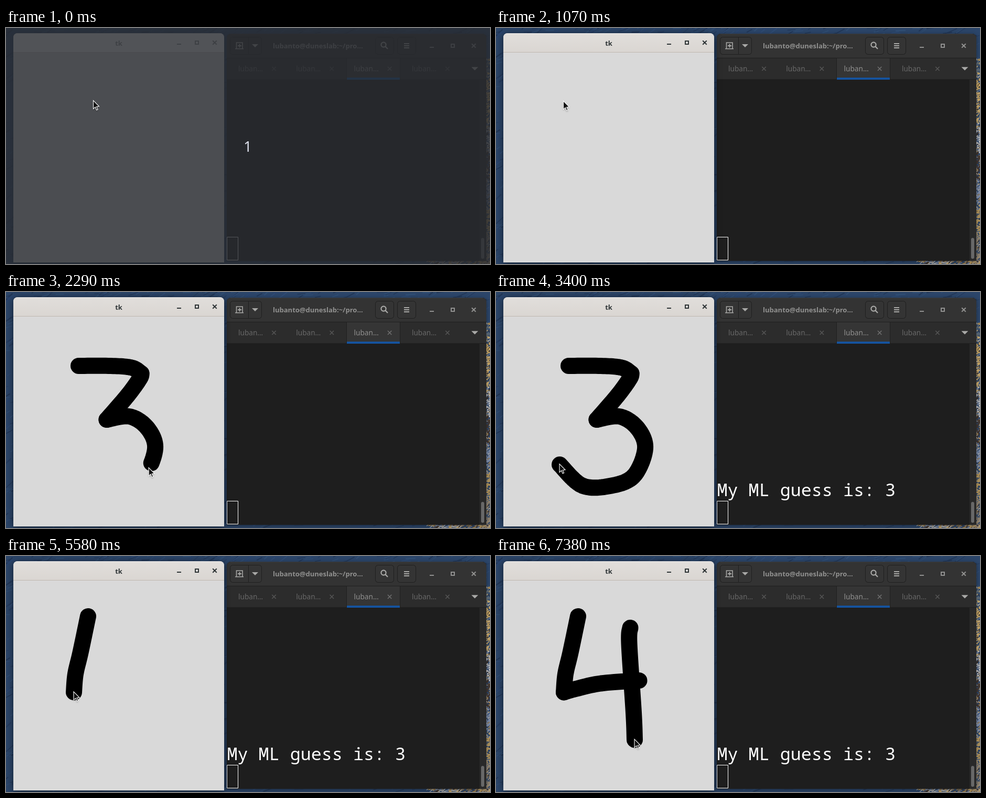
An HTML page with a canvas for the animation above (8000 ms loop, 923 by 452 pixels).

```html
<!DOCTYPE html>
<html lang="en">
<head>
<meta charset="utf-8">
<title>Digit guess</title>
<style>
html, body { margin: 0; width: 100%; height: 100%; overflow: hidden; background: #24344f; }
canvas { display: block; }
</style>
</head>
<body>
<canvas id="stage" width="923" height="452"></canvas>
<script>
const stage = document.getElementById('stage');
let ctx = stage.getContext('2d');
const W = 923, H = 452, LOOP = 8000;
const SANS = '"Noto Sans", sans-serif', MONO = '"Noto Sans Mono", monospace';
const FOCUS_AT = 1070, GUESS_AT = 3400, CLEAR_AT = 4420;
const BRUSH = 31, LEAD = 11;

const speedUp = p => p ** 1.15;
const slowDown = p => 1 - (1 - p) ** 2.2;

// Samples a Catmull-Rom curve through a few key points.
function smooth(keys, detail = 12) {
  const key = i => keys[Math.max(0, Math.min(keys.length - 1, i))];
  const points = [keys[0]];
  for (let i = 0; i < keys.length - 1; i++) {
    for (let j = 1; j <= detail; j++) {
      const u = j / detail;
      points.push([0, 1].map(axis => {
        const [a, b, c, d] = [-1, 0, 1, 2].map(k => key(i + k)[axis]);
        return b + u / 2 * (c - a + u * (2 * a - 5 * b + 4 * c - d + u * (3 * (b - c) + d - a)));
      }));
    }
  }
  return points;
}

// One pointer gesture, shown in evenly timed steps.
function gesture(ink, start, end, steps, keys, clear = LOOP) {
  const points = smooth(keys);
  const lengths = points.slice(1).map(([x, y], i) => Math.hypot(x - points[i][0], y - points[i][1]));
  return { ink, start, end, steps, clear, points, lengths, total: lengths.reduce((a, b) => a + b, 0) };
}

const rest = (at, x, y) => gesture(false, at, at, 1, [[x, y]]);

const gestures = [
  rest(0, 166, 138),
  rest(580, 161, 138),
  rest(1070, 128, 139),
  gesture(true, 1330, 1400, 2, [[138.5, 141.5], [200, 141.5], [240, 145], [258, 156]], CLEAR_AT),
  gesture(true, 1560, 1870, 5, [[258, 156], [255, 166], [232, 198], [192, 244.5]], CLEAR_AT),
  gesture(true, 2020, 2670, 8, [[192, 244.5], [236, 238.5], [270, 261], [284.5, 300], [263, 352],
    [220, 371], [165, 371], [121.5, 330.5]], CLEAR_AT),
  gesture(false, 4690, 5040, 5, [[120.5, 328], [126, 225], [148, 128], [156, 113]]),
  gesture(true, 5200, 5580, 5, [[156.5, 115.5], [142, 185], [132.5, 226], [129.5, 261]]),
  gesture(true, 5760, 6000, 4, [[129.5, 261], [150, 255], [200, 244], [273, 238.5]]),
  gesture(false, 6270, 6600, 5, [[272, 236.5], [261, 164], [255, 137]]),
  gesture(true, 6780, 7380, 7, [[256, 137.5], [254, 168], [262.5, 300], [264.5, 352]])
];

// Length of the gesture covered at time t, held between steps.
function covered(g, t) {
  const gap = (g.end - g.start) / Math.max(1, g.steps - 1) || 1;
  const step = Math.min(g.steps, Math.floor((t - g.start) / gap + 1.15));
  return (g.ink ? speedUp : slowDown)(step / g.steps) * g.total;
}

function pointAt({ points, lengths }, length) {
  for (let i = 0; i < lengths.length; i++) {
    if (length <= lengths[i]) {
      const k = length / lengths[i], [a, b] = [points[i], points[i + 1]];
      return [a[0] + (b[0] - a[0]) * k, a[1] + (b[1] - a[1]) * k];
    }
    length -= lengths[i];
  }
  return points[points.length - 1];
}

function pointerAt(t) {
  const g = gestures.filter(g => g.start <= t).pop();
  if (!g.ink) return pointAt(g, covered(g, t));
  const [x, y] = pointAt(g, covered(g, t) + LEAD);
  return [x - 1, y - 2];
}

function fillRect(x, y, w, h, color) {
  ctx.fillStyle = color;
  ctx.fillRect(x, y, w, h);
}

function box(x, y, w, h, radius, fill, line) {
  ctx.beginPath();
  ctx.roundRect(x, y, w, h, radius);
  if (fill) { ctx.fillStyle = fill; ctx.fill(); }
  if (line) { ctx.strokeStyle = line; ctx.lineWidth = 1; ctx.stroke(); }
}

function lines(color, width, ...paths) {
  ctx.strokeStyle = color;
  ctx.lineWidth = width;
  ctx.beginPath();
  for (const p of paths) p.forEach(([x, y], i) => i ? ctx.lineTo(x, y) : ctx.moveTo(x, y));
  ctx.stroke();
}

function text(str, x, y, font, color, align = 'left') {
  ctx.font = font;
  ctx.fillStyle = color;
  ctx.textAlign = align;
  ctx.fillText(str, x, y);
}

function cross(x, y, r, color, width = 2) {
  lines(color, width, [[x - r, y - r], [x + r, y + r]], [[x + r, y - r], [x - r, y + r]]);
}

function triangle(x, y, r, color) {
  ctx.fillStyle = color;
  ctx.beginPath();
  ctx.moveTo(x - r, y - r / 2);
  ctx.lineTo(x + r, y - r / 2);
  ctx.lineTo(x, y + r / 2);
  ctx.fill();
}

function windowControls(x, y, step, color) {
  fillRect(x - 4, y + 2, 8, 2, color);
  ctx.strokeStyle = color;
  ctx.lineWidth = 2;
  ctx.strokeRect(x + step - 3, y - 3, 6, 6);
  cross(x + step * 2, y, 3.8, color);
}

function shadowed(alpha, blur, draw) {
  ctx.save();
  ctx.shadowColor = `rgba(0,0,0,${alpha})`;
  ctx.shadowBlur = blur;
  ctx.shadowOffsetY = 2;
  draw();
  ctx.restore();
}

let seed = 7;
const random = () => (seed = seed * 16807 % 2147483647) / 2147483647;
const pick = list => list[Math.floor(random() * list.length)];

function streaks(count, x, y, w, h, size, colorAt) {
  for (let i = 0; i < count; i++) {
    const px = x + random() * w, py = y + random() * h;
    const dx = size * (.5 + random()), dy = -dx * random();
    lines(colorAt(py), 1 + random() * 1.5, [[px, py], [px + dx, py + dy]]);
  }
}

function paintWallpaper() {
  const blues = ['#263d60', '#2f4b74', '#2a4570', '#304e74', '#223757'];
  const earth = ['#c9a765', '#8f754c', '#3c3029', '#6d7f9e', '#b0aeaa'];
  const bands = ['#2f4c70', '#5f6d79', '#d0ad68', '#d3b170', '#c4c4c4', '#45362c', '#8190ad', '#bd9c5d', '#9a8a72'];
  fillRect(0, 0, W, H, '#2b4569');
  streaks(2500, -10, 0, W, H, 14, () => pick(blues));
  streaks(160, 800, 444, 120, 10, 6, () => pick(earth));
  streaks(1200, 908, 60, 15, 392, 3, y => random() < .3 ? pick(earth)
    : bands[Math.min(bands.length - 1, Math.floor((y + random() * 20) / H * bands.length))]);
}

const wallpaper = document.createElement('canvas');
wallpaper.width = W;
wallpaper.height = H;
const screen = ctx;
ctx = wallpaper.getContext('2d');
paintWallpaper();
ctx = screen;

function terminal(t) {
  const dim = '#919190', icon = '#a9a9a7', edge = '#1f1f1f';
  shadowed(.4, 8, () => box(421, 11, 495, 435, [8, 8, 0, 0], '#1e1e1e'));
  box(421, 11, 495, 47, [8, 8, 0, 0], '#333333');
  fillRect(428, 11, 481, 1, '#3b3b3b');
  fillRect(421, 57, 495, 1, edge);

  for (const [x, w] of [[427.5, 60], [704.5, 35], [746.5, 35]]) box(x, 17.5, w, 33, 5, '#343434', edge);
  fillRect(462, 18, 1, 33, edge);
  lines(icon, 1.6, [[437, 39.8], [453, 39.8]], [[439.5, 39.5], [439.5, 28], [451, 28], [451, 39.5]]);
  fillRect(442, 33, 7, 2, icon);
  fillRect(444.5, 30.5, 2, 7, icon);
  triangle(475, 34, 6, icon);
  lines(icon, 2.2, [[723.4, 35.4], [728, 40]]);
  ctx.beginPath();
  ctx.arc(720, 32, 4.6, 0, Math.PI * 2);
  ctx.stroke();
  for (let y = 29; y <= 37; y += 4) fillRect(759, y, 10, 2, icon);
  text('lubanto@duneslab:~/pro…', 509, 39, `bold 13px ${SANS}`, dim);
  windowControls(812, 34, 40, dim);

  fillRect(421, 58, 495, 40, '#2c2c2c');
  fillRect(649, 58, 103, 40, edge);
  fillRect(650, 58, 101, 40, '#353535');
  fillRect(421, 98, 495, 1, edge);
  fillRect(650, 95, 101, 4, '#15539e');
  for (let i = 0; i < 4; i++) {
    const x = 443 + i * 110.3, active = i === 2;
    text('luban…', x, 83, `13.6px ${SANS}`, active ? dim : '#686868');
    cross(x + 68, 78, 3.7, active ? '#6f6f6f' : '#555', 1.6);
  }
  triangle(894, 78, 6.5, icon);

  fillRect(903, 99, 13, 347, '#292929');
  box(906, 402, 6, 40, 3, '#686868');
  if (t >= GUESS_AT) text('My ML guess is: 3', 421.5, 391, `300 33.4px ${MONO}`, '#fff');
  box(421.5, 400.5, 21, 44, 0, null, '#fff');
}

function drawingWindow(t) {
  const focused = t >= FOCUS_AT;
  const ink = focused ? '#2e3436' : '#929595';
  const header = ctx.createLinearGradient(0, 10, 0, 46);
  header.addColorStop(0, '#e1dedb');
  header.addColorStop(1, '#dad6d2');
  shadowed(focused ? .6 : .35, focused ? 14 : 9, () => box(14, 10, 402, 439, [8, 8, 0, 0], '#d9d9d9'));
  box(14, 10, 402, 36, [8, 8, 0, 0], focused ? header : '#f6f5f4');
  fillRect(21, 10, 388, 1, focused ? '#efedeb' : '#f8f7f7');
  fillRect(14, 46, 402, 1, focused ? '#bfb8b1' : '#d5d0cc');
  text('tk', 215, 34, `bold 13px ${SANS}`, ink, 'center');
  windowControls(330, 28, 34, ink);
  drawInk(t);
}

function drawInk(t) {
  ctx.save();
  ctx.lineCap = ctx.lineJoin = 'round';
  for (const g of gestures) {
    if (!g.ink || t < g.start || t >= g.clear) continue;
    ctx.setLineDash([covered(g, t), 2000]);
    lines('#000', BRUSH, g.points);
  }
  ctx.restore();
}

function countdownOverlay() {
  fillRect(0, 0, W, H, 'rgba(40,43,48,.8)');
  text('1', 461, 236.5, `27px ${SANS}`, '#dfe3ee', 'center');
}

function pointer(x, y) {
  ctx.save();
  ctx.translate(x + .5, y + .8);
  ctx.beginPath();
  [[0, 0], [0, 16], [3.7, 12.7], [6.2, 18.4], [8.6, 17.3], [6.2, 11.8], [11, 11.3]]
    .forEach(([px, py]) => ctx.lineTo(px, py));
  ctx.closePath();
  shadowed(.35, 3, () => { ctx.fillStyle = '#111'; ctx.fill(); });
  ctx.strokeStyle = '#fff';
  ctx.lineWidth = 1.1;
  ctx.stroke();
  ctx.restore();
}

function frame(now) {
  const t = now % LOOP;
  ctx.drawImage(wallpaper, 0, 0);
  terminal(t);
  drawingWindow(t);
  if (t < 20) countdownOverlay();
  pointer(...pointerAt(t));
}

const start = performance.now();
function tick() {
  frame(performance.now() - start);
  requestAnimationFrame(tick);
}
tick();
</script>
</body>
</html>
```
